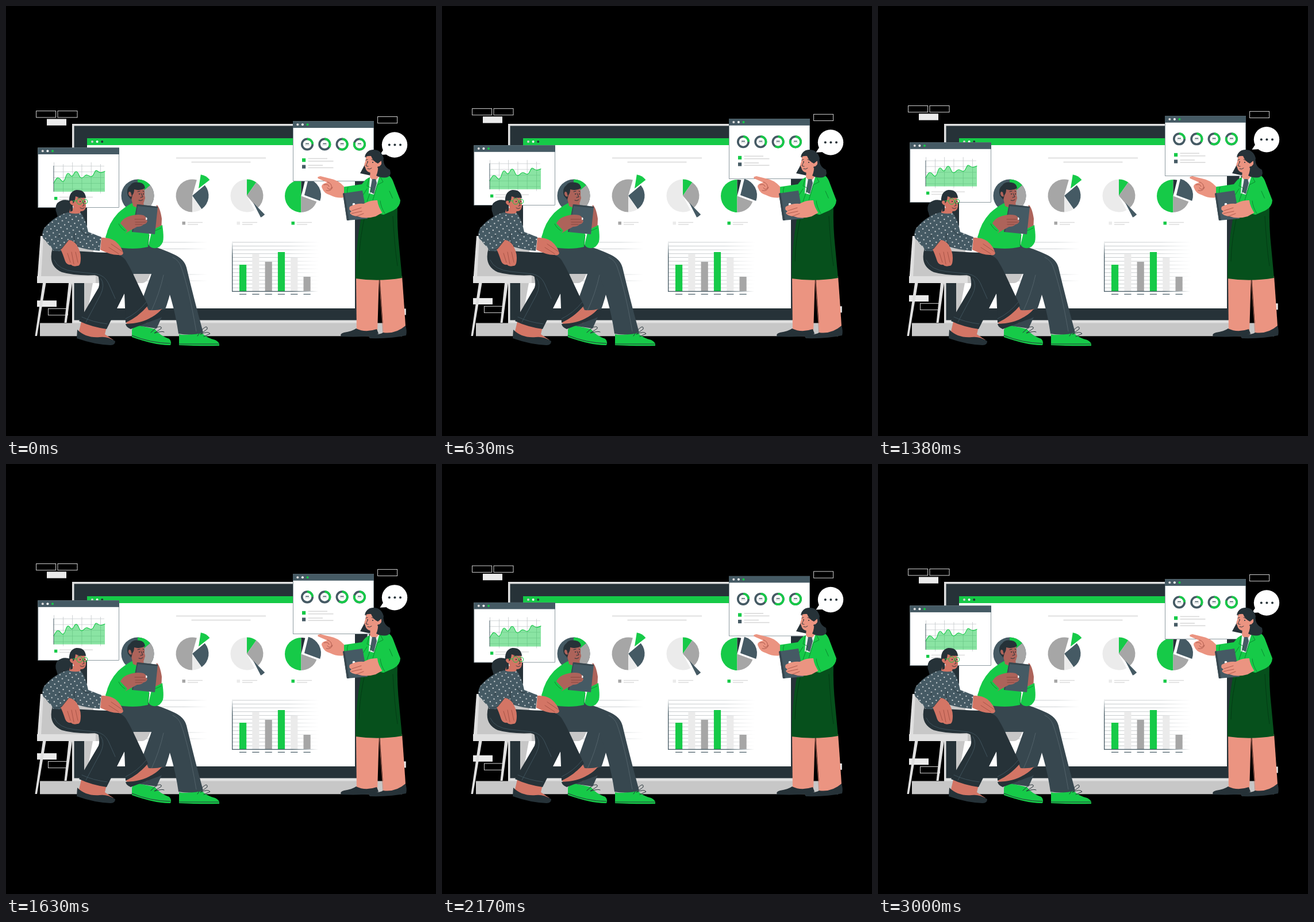
Write an HTML page that moves like this. It is 748x748 px and loops after 3040 ms.

```html
<!DOCTYPE html>
<html lang="en">
<head>
<meta charset="utf-8">
<title>Presentation</title>
<style>
html, body { margin: 0; width: 100%; height: 100%; overflow: hidden; background: #000; }
svg { display: block; width: 100vw; height: 100vh; }
</style>
</head>
<body>
<svg id="stage" viewBox="0 0 748 748"></svg>
<script>
const GREEN = '#16ca48', DARK = '#263238', SLATE = '#455a64', PANTS = '#37474f';
const GREY = '#a6a6a6', PALE = '#ebebeb', RULE = '#dbdbdb', FLOOR = '#c7c7c7', FRAME = '#e0e0e0';
const TAN = '#d37565', BROWN = '#ad635a', PEACH = '#eb9481', FOREST = '#06501c';

const path = (d, fill) => `<path d="${d}" fill="${fill}"/>`;
const line = (d, color, w = 1) =>
  `<path d="${d}" fill="none" stroke="${color}" stroke-width="${w}" stroke-linecap="round" stroke-linejoin="round"/>`;
const rect = (x, y, w, h, fill) => `<rect x="${x}" y="${y}" width="${w}" height="${h}" fill="${fill}"/>`;
const box = (x, y, w, h, color = '#e6e6e6', sw = .9) =>
  `<rect x="${x}" y="${y}" width="${w}" height="${h}" fill="none" stroke="${color}" stroke-width="${sw}"/>`;
const dot = (x, y, r, fill) => `<circle cx="${x}" cy="${y}" r="${r}" fill="${fill}"/>`;
const dots = (x, y, colors) => colors.map((c, i) => dot(x + i * 8.6, y, 2, c)).join('');
const floating = s => `<g class="float">${s}</g>`;
const spotted = d => path(d, SLATE) + path(d, 'url(#spots)');

// Angles in degrees, clockwise from the top
function point(cx, cy, r, a) {
  const t = a * Math.PI / 180;
  return (cx + r * Math.sin(t)).toFixed(2) + ' ' + (cy - r * Math.cos(t)).toFixed(2);
}
const arc = (cx, cy, r, a, b) =>
  `${point(cx, cy, r, a)}A${r} ${r} 0 ${b - a > 180 ? 1 : 0} 1 ${point(cx, cy, r, b)}`;
const slice = (cx, cy, r, a, b, fill) => path(`M${cx} ${cy}L${arc(cx, cy, r, a, b)}Z`, fill);

function fadeLines(x, w, ys) {
  return ys.map(y => rect(x, y - .5, w, 1, 'url(#fade)')).join('');
}

function legend(x, color) {
  return rect(x, 375, 5.5, 5.5, color) + rect(x + 9.5, 375.8, 26, 1.4, RULE) + rect(x + 9.5, 379.3, 18, 1.4, RULE);
}

function screen() {
  let s = rect(115, 205, 517, 347, FRAME) + rect(118.5, 208.5, 510, 338, DARK) +
    rect(141, 230, 466, 296, '#fff') + rect(141, 230, 466, 12, GREEN) +
    dots(150, 236, ['#d0d0d0', '#fff', DARK]) +
    rect(296, 263.6, 156, 1.7, RULE) + rect(322.5, 270.7, 103, 1.7, RULE);

  s += dot(229, 330, 28.5, SLATE) + slice(229, 330, 28.5, 0, 50, GREEN) + slice(229, 330, 28.5, 50, 180, GREY);
  s += slice(324, 330, 28.5, 180, 376, GREY) + slice(324, 330, 28.5, 50, 145, SLATE) +
    slice(324, 330, 28.5, 145, 180, PALE) + slice(335, 317.5, 24.5, 9, 52, GREEN);
  s += slice(419, 330, 28.5, 152, 360, PALE) + slice(419, 330, 28.5, 0, 35, GREEN) +
    slice(419, 330, 28.5, 35, 140, GREY) + slice(430, 342, 29, 136, 153, SLATE);
  s += slice(513.5, 330.5, 28.5, 180, 360, GREEN) + slice(513.5, 330.5, 28.5, 0, 14, DARK) +
    slice(513.5, 330.5, 28.5, 110, 180, GREY) + slice(519, 329, 29, 14, 110, SLATE);
  s += legend(306.5, GREY) + legend(401.5, PALE) + legend(496.5, GREEN);

  s += fadeLines(235, 116, [411, 422.5, 467, 478]);
  s += fadeLines(394, 151, Array.from({length: 13}, (_, i) => 411 + i * 6.6));
  [[450, GREEN], [431, PALE], [445, GREY], [428, GREEN], [438, PALE], [471, GREY]].forEach(([y, c], i) => {
    const x = 406 + i * 22.3;
    s += rect(x, y, 12.2, 496 - y, c) + rect(x, 500.8, 12.2, 1.2, SLATE);
  });
  return s + rect(393, 408, 1.3, 88.5, 'url(#rise)') + rect(393, 495.8, 150, 1.3, 'url(#base)');
}

function panel(x, y, w) {
  return rect(x, y, w, 104.5, '#fff') + box(x + .4, y + .4, w - .8, 103.7, SLATE, .6) + rect(x, y, w, 11.5, SLATE) +
    dots(x + 8.3, y + 5.8, [RULE, '#fff', GREEN]);
}

function areaPanel() {
  let s = panel(55.5, 246.5, 141.5);
  for (let i = 0; i < 6; i++) s += rect(83 + i * 16.2, 272 + (i % 2) * 3, .7, 51, '#b9bfc2');
  for (let i = 0; i < 5; i++) s += rect(82, 278 + i * 10, 89, .7, '#c3c8ca');
  const top = 'M83 308C86 304 87 298 91 299C96 300 96 307 100 305C104 302 104 291 108 291C112 291 111 297 115 296C119 294 118 288 122 288C127 288 126 298 131 299C136 300 136 293 141 294C146 295 147 299 151 295C155 289 155 284 159 287C164 291 166 290 172 287.5';
  return s + path(top + 'V323H83Z', 'rgba(22,202,72,.5)') + line(top, GREEN, 1.1) + rect(82.5, 278, .8, 45, SLATE) +
    rect(84, 332, 5.3, 5.3, GREEN) + rect(93, 331.8, 58, 1.4, RULE) + rect(93, 336, 40, 1.4, RULE);
}

function ringPanel() {
  let s = panel(499, 200.5, 141);
  [90, 125, 215, 290].forEach((end, i) => {
    const x = 524 + i * 30.3, y = 240.5;
    s += `<circle cx="${x}" cy="${y}" r="9.2" fill="none" stroke="${SLATE}" stroke-width="3.7"/>` +
      `<path d="M${arc(x, y, 9.2, 0, end)}" fill="none" stroke="${GREEN}" stroke-width="3.7"/>` +
      rect(x - 3, y - 1.8, 6, 1.5, SLATE) + rect(x - 4, y + 1, 8, .8, '#b0b8bc');
  });
  return s + rect(515, 265, 6.2, 6.2, GREEN) + rect(515, 276.5, 6.2, 6.2, SLATE) +
    rect(525.5, 264.6, 33.5, 1.7, RULE) + rect(525.5, 269, 44, 1.7, RULE) +
    rect(525.5, 276.3, 25.5, 1.7, RULE) + rect(525.5, 280.5, 44, 1.7, RULE);
}

function chairs() {
  return path('M136 482H151L141 536H136Z', FLOOR) +
    path('M150 462H252Q247 482 236 482H140Z', FLOOR) +
    path('M64 482H69.5L54 574H50.5Z', FRAME) + path('M109 482H115L105.5 551H101.5Z', FRAME) +
    path('M60 400H150L156 482H54Z', FRAME) + path('M65 402H150L156 470H61Z', FLOOR) +
    path('M54 470H156V482H54Z', FRAME);
}

function man() {
  return path('M219 563Q223 554 232 556L259 562Q267 573 284 579Q289 584 286 590Q262 591 219 576Z', GREEN) +
    line('M219 573Q250 586 286 587M252 568L262 559Q272 556 270 561L258 569Q272 565 275 567', DARK, 1) +
    path('M256 458L293 464Q286 505 276 530L262 561L222 555L238 508Z', PANTS) +
    path('M160 462H222L216 512L205 500Q185 505 163 490Z', PANTS) +
    path('M301 571Q310 574 340 568Q348 577 364 581Q372 585 371 591Q340 592 301 590Z', GREEN) +
    line('M301 588H370M333 574L342 562Q351 554 350 562L338 571Q352 565 355 570L344 575', DARK, 1) +
    path('M178 420L247 415Q275 424 292 432Q310 440 314 455Q327 510 343 568Q323 574 300 570Q293 520 273 466L200 466L172 440Z', PANTS) +
    line('M290 437Q300 442 304 452Q318 490 331 566M274 468Q267 500 253 530', '#5d6d75', .7) +
    path('M262 346Q268 350 271 370L270 395L254 393Z', BROWN) +
    path('M219 343Q229 341 240 350L246 380L249 398Q248 410 247 419Q222 425 190 419Q172 412 174 401Q178 378 195 360Q207 349 219 343Z', GREEN) +
    path('M254 390L272 381Q275 402 273 410Q269 420 261 421Q251 422 248 415Z', GREEN) +
    line('M250 392Q258 393 270 386M185 417Q198 407 205 393M196 388Q186 396 179 406M249 398Q248 408 247 416', '#0b7d2b', .8) +
    path('M217 331L221 348Q232 354 240 349L239 340Z', BROWN) +
    path('M217 318Q222 309 237 311Q242 319 241 330Q243 334 241 337Q240 346 231 345Q222 342 219 331Q214 331 214 326Z', BROWN) +
    path('M212 330Q208 318 217 311Q221 305 232 307Q241 308 242 317Q233 322 223 319Q223 325 220 329L218 337Z', DARK) +
    path('M217 324Q213 321 213 327Q215 333 219 331Z', BROWN) +
    line('M229 323L233 322M238 322L240 323M235 326L238 332L234 333M231 338Q235 340 238 337', DARK, 1) +
    dot(232, 327, 1, DARK) + dot(239, 327, .9, DARK) +
    path('M228 345L264 349L259 397L219 393Z', SLATE) + path('M228 345L264 349L263.7 351.5L229 348L221 393L219 393Z', PANTS) +
    dot(243, 370, 2.6, '#fff') +
    path('M196 389Q198 372 211 367Q226 361 239 364Q245 367 243 371L246 374Q245 379 239 380Q236 384 228 384Q215 391 203 398Z', BROWN) +
    line('M224 371L241 371M225 376L243 376M225 380L237 380', '#7b4038', .8) +
    path('M173 402Q180 381 194 373L211 391Q200 407 187 416Q176 413 173 402Z', GREEN) +
    line('M196 379Q200 387 207 391', '#0b7d2b', .8);
}

function listener() {
  const sleeve = 'M64 401L95 403Q106 404 109 407L96 423Q81 424 73 414Z';
  return path('M112 339Q99 334 89 343Q84 351 88 360Q89 369 97 371L116 363Z', DARK) +
    path('M131 549L175 558L172 571L187 581L155 586L126 570Z', TAN) +
    path('M124 563Q139 578 163 576Q176 574 190 583Q190 590 182 590Q154 589 123 578Z', DARK) +
    path('M208 550L243 518L248 529Q262 530 272 527L246 551L216 559Z', TAN) +
    path('M208 553Q236 552 252 542Q265 535 270 528Q282 526 284 532Q276 541 256 547L217 562Q209 559 208 553Z', DARK) +
    path('M81 421Q72 452 97 463Q121 470 159 468Q165 477 161 490L127 548Q148 558 175 562L207 498L150 440Z', DARK) +
    path('M81 421L110 425Q142 428 178 429Q200 431 208 442Q216 455 222 468L247 521Q230 541 208 551L206 499L178 490Q171 471 150 467L110 455Z', DARK) +
    line('M84 442Q91 459 120 462L157 466Q172 469 178 482L190 509M165 474Q173 485 164 503L139 550M208 544Q229 534 244 515M132 541Q151 550 176 553', SLATE, .8) +
    path('M112 351L109 363Q119 370 129 362L130 352Z', TAN) +
    path('M113 329Q119 323 135 330Q140 337 139 349Q137 358 130 357Q119 355 116 347Q111 347 111 342Z', TAN) +
    path('M110 344Q108 323 122 320Q137 319 139 333Q129 335 121 331Q120 341 116 344L116 356L112 358Z', DARK) +
    path('M116 339Q111 337 111 342Q113 347 117 346Z', TAN) +
    `<g fill="none" stroke="${GREEN}" stroke-width="1"><circle cx="128" cy="340" r="5"/><circle cx="138" cy="340" r="3.8"/><path d="M116 339L123 339"/></g>` +
    line('M125 334L130 333M136 333L139 334M134 341L136 347L133 348M129 351Q133 354 136 351', DARK, .9) +
    dot(129, 340, 1, DARK) + dot(137, 340, .9, DARK) +
    spotted('M108 359Q119 363 130 360Q138 369 143 393L166 402L163 426Q139 424 125 419L117 427L82 426Q78 414 65 405Q61 397 66 387Q84 365 108 359Z') +
    line('M130 389Q137 401 145 397M83 416Q91 409 93 398M126 418Q116 411 119 395', DARK, .8) +
    path('M166 403Q180 402 190 409Q201 418 204 430Q202 435 196 433Q184 434 164 424Z', TAN) +
    line('M183 414L202 427M179 420L196 431', '#9e4c40', .8) +
    path('M98 412Q108 401 121 413Q130 425 130 438Q130 453 124 452Q117 454 113 450Q106 451 103 444Q98 429 94 421Z', TAN) +
    line('M107 430L112 446M114 428L118 449M121 428L125 446', '#9e4c40', .8) +
    spotted(sleeve) + line('M82 424Q91 425 97 422L109 407', DARK, .7);
}

function speaker() {
  return path('M609 470H649L646 568L610 571Z', PEACH) + path('M650 470H689Q693 525 696 572L657 573Z', PEACH) +
    line('M649 474L656 569', '#c8715f', .8) +
    path('M609 561Q625 569 645 562L648 570Q634 577 583 575Q580 570 588 568Q602 566 609 561Z', DARK) +
    path('M656 568Q678 571 695 556Q698 566 696 573Q670 579 633 578Q628 574 636 571Q650 572 656 568Z', DARK) +
    path('M622 342L681 348Q680 383 684 420L689 473Q648 480 608 474Q608 420 617 372Z', FOREST) +
    line('M626 358Q615 402 614 444M673 366Q676 420 681 452', '#033813', .8) +
    path('M622 280Q628 269 625 260Q629 249 640 250Q653 250 657 265Q654 276 669 291Q665 299 652 298Q633 295 616 291Z', DARK) +
    path('M641 297L651 290Q667 290 673 304Q679 320 686 338Q686 349 673 356L656 363L620 352L621 329L588 337L585 315L619 310Q627 299 633 298Z', GREEN) +
    path('M634 284L633 299L642 306L650 296L649 281Z', PEACH) +
    path('M633 298L641 306L650 295L640 328L631 326Z', '#e8f2ee') + path('M637 301L643 301L645 308L640 327L633 323Z', SLATE) +
    path('M648 262L656 262Q655 279 668 285Q671 296 663 298Q652 300 644 295Q648 287 647 276Z', DARK) +
    path('M627 260Q638 260 645 264L649 269Q654 267 653 275Q650 280 647 279Q644 288 634 290Q626 288 625 281Q622 277 625 271Z', PEACH) +
    path('M624 263Q626 251 640 251Q651 255 653 269L647 274Q639 271 635 261Q631 260 624 263Z', DARK) +
    line('M626 268L629 267M636 267L641 269M629 272L626 278L630 279M629 283Q633 285 636 282', DARK, .9) +
    dot(629, 271, .9, DARK) + dot(638, 272, 1, DARK) +
    line('M621 329L628 318M632 299L628 313L636 317L628 340M651 297L656 306L646 311L638 338M667 322L674 338L651 339L659 361M595 315Q591 325 597 331', '#087a2b', .8) +
    path('M588 314Q577 302 563 300L547 296Q540 297 543 300L559 307Q546 310 550 317Q553 326 564 329Q576 335 588 333Z', PEACH) +
    line('M559 306Q568 309 566 317Q562 321 559 316M553 311Q561 309 562 314M557 321Q566 323 568 315', '#9e4c40', .8) +
    path('M586 326L620 321L629 370L593 373Z', SLATE) + path('M586 326L589 325L597 372.7L593 373Z', PANTS) +
    dot(605, 345, 2.3, '#fff') +
    path('M598 349Q609 343 622 344Q634 337 646 338L659 357L643 366Q625 371 612 366Q600 365 598 360L601 357Q595 354 598 349Z', PEACH) +
    line('M602 356L618 351M601 361L619 357M609 366L622 361', '#9e4c40', .8) +
    path('M646 338L671 334L685 339Q685 351 672 356L657 363Q647 350 646 338Z', GREEN) +
    line('M651 339Q652 350 659 361', '#087a2b', .8);
}

const defs = `<defs>
  <linearGradient id="fade"><stop offset="0" stop-color="#c4c8ca"/><stop offset=".65" stop-color="#cfd3d5"/><stop offset="1" stop-color="#fff"/></linearGradient>
  <linearGradient id="base"><stop offset=".7" stop-color="${SLATE}"/><stop offset="1" stop-color="#fff"/></linearGradient>
  <linearGradient id="rise" x2="0" y2="1"><stop offset="0" stop-color="#fff"/><stop offset=".3" stop-color="${SLATE}"/></linearGradient>
  <pattern id="spots" width="11" height="12" patternUnits="userSpaceOnUse" patternTransform="rotate(12)">
    <circle cx="3" cy="3" r="1" fill="#fff"/><circle cx="8.5" cy="9" r="1" fill="#fff"/></pattern>
</defs>`;

const tags = box(52.6, 182.6, 34, 11.3) + box(90, 182.6, 34, 11.3) + rect(71, 196.5, 34, 11.3, PALE) +
  box(646.6, 192.5, 34, 11.3) + rect(54, 512.3, 34, 11, PALE) + box(73.5, 526.5, 34, 11.3) +
  rect(662, 526.5, 33.7, 11, PALE);

const bubble = dot(676, 241.5, 22.2, '#fff') + path('M659 246L650.5 259L669 258Z', '#fff') +
  [666.8, 676.4, 686].map(x => dot(x, 241.5, 2, DARK)).join('');

document.getElementById('stage').innerHTML = defs + floating(tags) + screen() + rect(59, 551.5, 630, 22.8, FLOOR) +
  floating(areaPanel()) + floating(ringPanel()) + chairs() + man() + listener() + floating(bubble) + speaker();

const floats = document.querySelectorAll('.float');
const LOOP = 3040, PEAK = 1505, LIFT = 10;

function draw(now) {
  const t = now % LOOP;
  const y = -LIFT * Math.max(0, 1 - Math.abs(t / PEAK - 1));
  floats.forEach(g => g.setAttribute('transform', `translate(0 ${y.toFixed(2)})`));
  requestAnimationFrame(draw);
}
draw(0);
</script>
</body>
</html>
```
